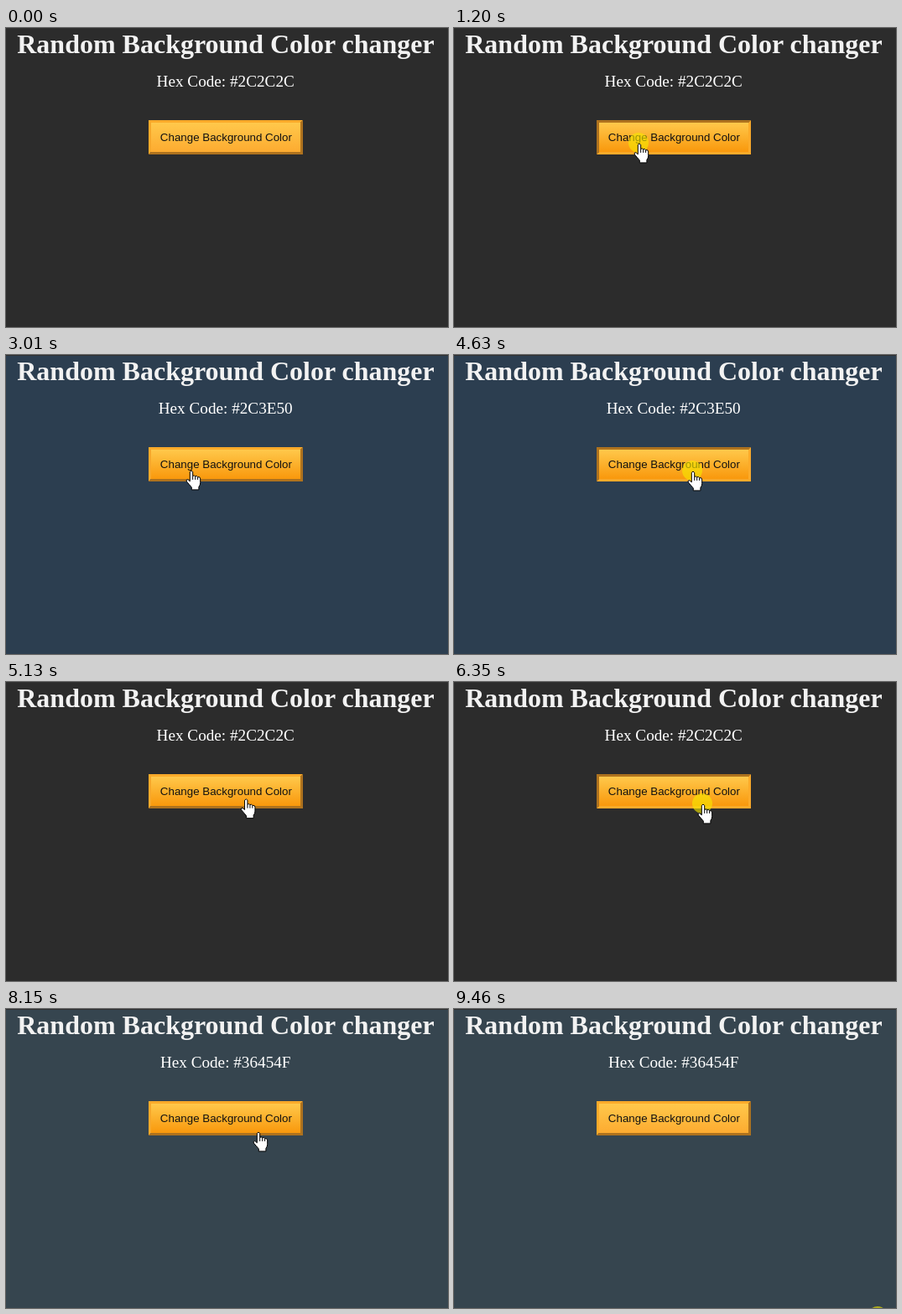
An HTML page that plays this animation: 527 by 357 pixels, repeating every 9760 ms.

```html
<!DOCTYPE html>
<html lang="en">
<head>
<meta charset="utf-8">
<title>Random Background Color changer</title>
<style>
  html, body { margin: 0; width: 100%; height: 100%; overflow: hidden; background: #2c2c2c; }
  svg { display: block; }
  text { text-anchor: middle; fill: #f2f2f2; font-family: "Liberation Serif", "Times New Roman", serif; }
  #code { fill: #fff; }
  #label { fill: #111; font: 13.333px "Liberation Sans", Arial, sans-serif; }
</style>
</head>
<body>
<svg width="527" height="357" viewBox="0 0 527 357">
  <defs>
    <linearGradient id="idle" x2="0" y2="1">
      <stop stop-color="#ffc84b"/><stop offset="1" stop-color="#fdab30"/>
    </linearGradient>
    <linearGradient id="hover" x2="0" y2="1">
      <stop stop-color="#ffc84b"/><stop offset="1" stop-color="#f9980c"/>
    </linearGradient>
  </defs>
  <rect id="page" width="527" height="357"/>
  <rect width="527" height="1" fill="#303030"/>
  <text x="262" y="30" font-size="32" font-weight="bold">Random Background Color changer</text>
  <text id="code" x="261.7" y="70" font-size="19.2"></text>
  <path id="topLeft" d="M170 151V110H354L351 113H173V148Z"/>
  <path id="bottomRight" d="M170 151H354V110L351 113V148H173Z"/>
  <rect id="face" x="173" y="113" width="178" height="35"/>
  <text id="label" x="262.4" y="135">Change Background Color</text>
  <circle id="click" r="12" fill="#f5e800"/>
  <g id="cursor" fill="#fff" stroke="#000" stroke-linejoin="round">
    <path id="arrow" d="M.5 .5V16.5L4.2 13L6.7 18.6L9.1 17.5L6.7 12.1H11.8Z"/>
    <g id="hand" transform="translate(-5.7 .4)">
      <path d="M5 2Q6.7 -.6 8.4 2V7Q10 5.8 11.4 7.4Q13 6.4 14.3 8.2Q17.4 7.6 17.4 10.5V15Q17.4 18 15.6 20V23.5H7V20.6Q4 17 1 13.6Q0 11 2.6 11.2L5 13.4Z"/>
      <path fill="none" d="M8.4 7V11.5M11.4 7.5V11.5M14.3 8.5V11.5"/>
    </g>
  </g>
</svg>
<script>
const LOOP = 9760, STEP = 102;
const $ = id => document.getElementById(id);

// The colour changes when the button is released
const clicks = [
  { down: 1200, up: 1400, color: "#4A235A" },
  { down: 2910, up: 3010, color: "#2C3E50" },
  { down: 4630, up: 4730, color: "#2C2C2C" },
  { down: 6350, up: 6550, color: "#4A235A" },
  { down: 7950, up: 8150, color: "#36454F" },
  { down: 9360, up: LOOP }
];

// The pointer glides to each place in a number of equal time steps
const moves = [
  { start: 290, steps: 5, x: 210, y: 144 },
  { start: 900, steps: 2, x: 220, y: 137 },
  { start: 3110, steps: 5, x: 249, y: 190 },
  { start: 3820, steps: 5, x: 284, y: 138 },
  { start: 5130, steps: 5, x: 296, y: 145 },
  { start: 6550, steps: 1, x: 300, y: 146 },
  { start: 8350, steps: 1, x: 320, y: 165 },
  { start: 8450, steps: 1, x: 505, y: 367 }
];

const ease = p => p * p * (3 - 2 * p);

function pointer(t) {
  let x = 490, y = 365;
  for (const move of moves) {
    if (t < move.start) break;
    const done = Math.floor((t - move.start) / STEP) + 1;
    const p = ease(Math.min(1, done / move.steps));
    x += (move.x - x) * p;
    y += (move.y - y) * p;
  }
  return [x, y];
}

const set = (id, attrs) => {
  for (const name in attrs) $(id).setAttribute(name, attrs[name]);
};

function draw(now) {
  const t = now % LOOP;
  const [x, y] = pointer(t);
  const color = clicks.findLast(c => c.up <= t)?.color ?? "#2C2C2C";
  const down = clicks.some(c => c.down <= t && t < c.up);
  const over = x >= 170 && x < 354 && y >= 110 && y < 151;
  const light = "#fbaa2a", dark = "#ae721e";

  set("page", { fill: color });
  $("code").textContent = "Hex Code: " + color;
  set("topLeft", { fill: over && down ? dark : light });
  set("bottomRight", { fill: over && down ? light : dark });
  set("face", { fill: over ? "url(#hover)" : "url(#idle)" });
  set("click", { cx: x, cy: y, opacity: down ? .62 : 0 });
  set("cursor", { transform: `translate(${x} ${y})` });
  set("hand", { visibility: over ? "visible" : "hidden" });
  set("arrow", { visibility: over ? "hidden" : "visible" });
}

const begin = performance.now();
function tick() {
  draw(performance.now() - begin);
  requestAnimationFrame(tick);
}
tick();
</script>
</body>
</html>
```
